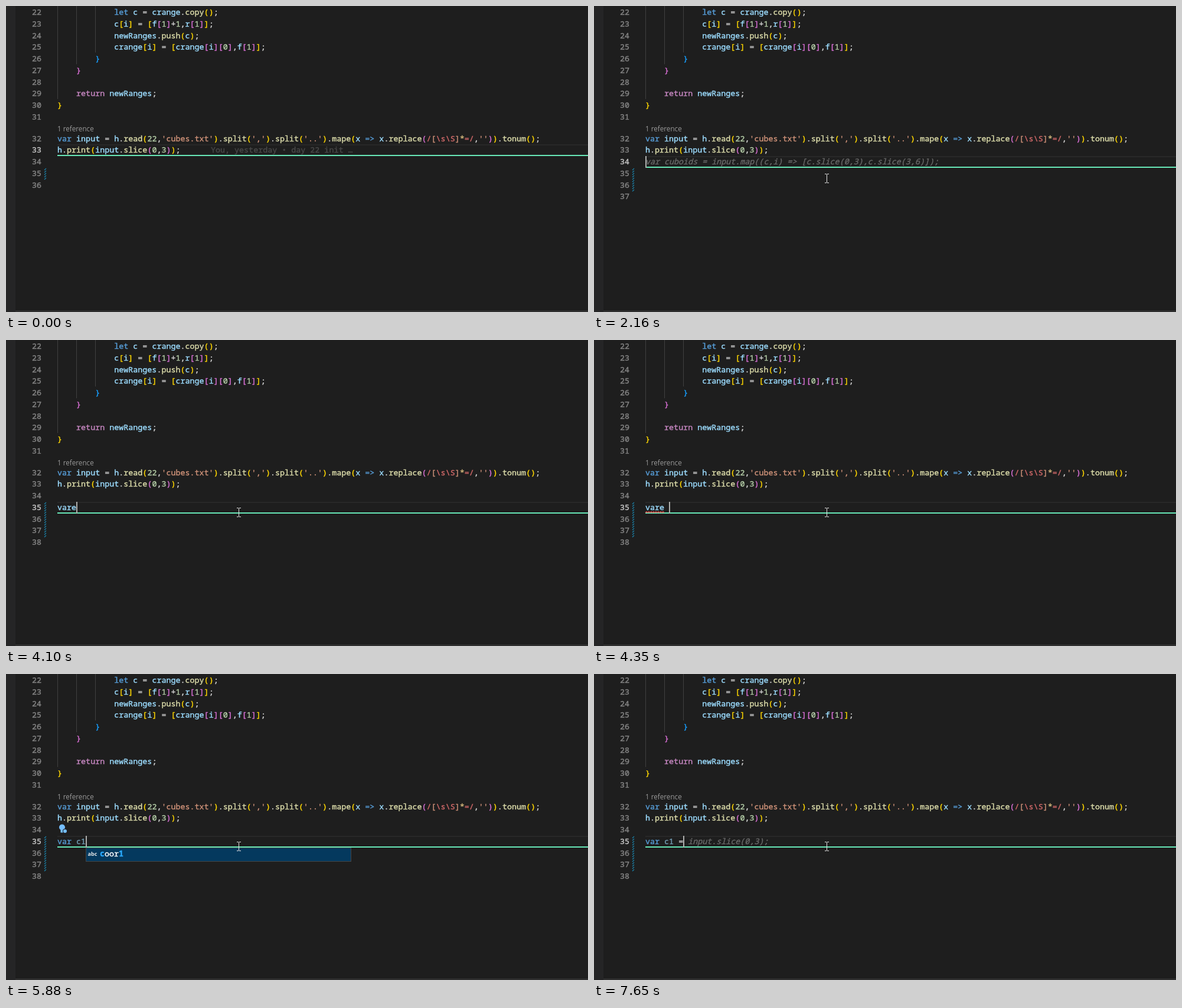
Write an HTML page with a canvas that moves like this. It is 986 by 520 pixels and loops after 8 s.

```html
<!DOCTYPE html>
<html lang="en">
<head>
<meta charset="utf-8">
<style>
  html, body { margin: 0; height: 100%; overflow: hidden; background: #1e1e1e; }
  canvas { display: block; }
</style>
</head>
<body>
<canvas id="stage" width="986" height="520"></canvas>
<script>
const ctx = document.getElementById('stage').getContext('2d');
const LOOP = 8000, LEFT = 87, CHAR = 8.02;
const MONO = '13.367px "Noto Sans Mono", monospace';
const BRACKETS = ['#ffd700', '#da70d6', '#179fff'];
const TOKEN = /'[^']*'|\/\[.*?=\/|=>|\w+|\s+|./g;

// line number: [indent, code, bracket depth at line start]
const CODE = {
  22: [12, 'let c = crange.copy();', 0],
  23: [12, 'c[i] = [f[1]+1,r[1]];', 0],
  24: [12, 'newRanges.push(c);', 0],
  25: [12, 'crange[i] = [crange[i][0],f[1]];', 0],
  26: [8, '}', 3],
  27: [4, '}', 2],
  29: [4, 'return newRanges;', 0],
  30: [0, '}', 1],
  32: [0, "var input = h.read(22,'cubes.txt').split(',').split('..').mape(x => x.replace(/[\\s\\S]*=/,'')).tonum();", 0],
  33: [0, 'h.print(input.slice(0,3));', 0]
};

const CUBOIDS = 'var cuboids = input.map((c,i) => [c.slice(0,3),c.slice(3,6)]);';
const IN_RANGE = 'var inRangeCuboids = (cuboid:number[][], ranges:number[][][]) : number[][][] => {';
const SLICE = 'var c1 = input.slice(0,3);';
const V_WORDS = ['var', 'variable', 'vector', 'value', 'values', 'valid', 'view', 'visit', 'vertex', 'void', 'volume', 'while'];
const C_WORDS = ['c', 'case', 'catch', 'class', 'const', 'continue', 'coor1', 'coor2', 'copy', 'crange', 'cubes', 'cuboid'];

// Each event changes part of the editor state.
const START = { line: 33, last: 36, changed: [35, 35], typed: '', ghost: '', caret: false, blame: true, popup: null, bulb: false, squiggle: false };
const EVENTS = [
  [900, { caret: true }],
  [1430, { caret: false }],
  [1960, { line: 34, last: 37, changed: [36, 36], caret: true, blame: false }],
  [2090, { changed: [35, 36] }],
  [2160, { ghost: CUBOIDS }],
  [2490, { caret: false }],
  [2690, { line: 35, last: 38, changed: [36, 37], caret: true, ghost: '' }],
  [2820, { changed: [35, 37] }],
  [2880, { ghost: IN_RANGE }],
  [3150, { caret: false }],
  [3500, { typed: 'v', caret: true }],
  [3630, { typed: 'va' }],
  [3760, { typed: 'var' }],
  [4100, { typed: 'vare', ghost: '' }],
  [4160, { popup: V_WORDS }],
  [4290, { squiggle: true }],
  [4350, { typed: 'vare ', popup: null }],
  [4410, { typed: 'vare' }],
  [4480, { typed: 'var', squiggle: false }],
  [4680, { ghost: IN_RANGE }],
  [4940, { typed: 'var ', ghost: '' }],
  [5000, { ghost: IN_RANGE }],
  [5200, { typed: 'var c', ghost: '', popup: C_WORDS }],
  [5550, { typed: 'var c1', popup: null }],
  [5620, { popup: ['coor1'] }],
  [5880, { bulb: true }],
  [6140, { caret: false }],
  [6200, { bulb: false }],
  [6460, { bulb: true }],
  [6530, { caret: true }],
  [6730, { typed: 'var c1 ', popup: null }],
  [6990, { bulb: false }],
  [7130, { caret: false }],
  [7190, { ghost: SLICE }],
  [7650, { typed: 'var c1 =', caret: true }]
];
const MOUSE = [[70, 612, 460], [220, 360, 380], [390, 73, 300], [600, 330, 255], [770, 380, 247], [900, 380, 247], [980, 384, 239], [1230, 394, 293]];

const baseline = n => Math.round(n < 32 ? 15 + (n - 22) * 19.75 : 229.7 + (n - 32) * 19.75);
const rowTop = n => baseline(n) - 14;
const colX = col => LEFT + col * CHAR;

function rect(x, y, w, h, color) {
  ctx.fillStyle = color;
  ctx.fillRect(x, y, w, h);
}

// A hairline outline gives the text its slightly heavy weight.
function text(str, x, y, color, font = MONO, weight = 0.4) {
  ctx.font = font;
  ctx.fillStyle = ctx.strokeStyle = color;
  ctx.lineWidth = weight;
  ctx.fillText(str, x, y);
  if (weight) ctx.strokeText(str, x, y);
}

function stroke(points, color, width = 1) {
  ctx.beginPath();
  points.forEach(([x, y]) => ctx.lineTo(x, y));
  ctx.strokeStyle = color;
  ctx.lineWidth = width;
  ctx.stroke();
}

function tokenColor(token, next) {
  if (token[0] === "'") return '#ce9178';
  if (token === '=>' || token === 'let' || token === 'var') return '#569cd6';
  if (token === 'return') return '#c586c0';
  if (/^\d/.test(token)) return '#b5cea8';
  if (/^\w/.test(token)) return next === '(' ? '#dcdcaa' : '#9cdcfe';
  return '#d4d4d4';
}

function drawCode(n, indent, code, depth, unused) {
  const y = baseline(n);
  for (const { 0: token, index } of code.matchAll(TOKEN)) {
    const x = colX(indent + index);
    if (token.startsWith('/[')) {
      [...token].forEach((ch, i) => text(ch, x + i * CHAR, y,
        '[]'.includes(ch) ? '#ce9178' : ch === '*' ? '#d7ba7d' : '#d16969'));
      continue;
    }
    let color = token === unused ? '#729db3' : tokenColor(token, code[index + token.length]);
    if ('([{'.includes(token)) color = BRACKETS[depth++ % 3];
    else if (')]}'.includes(token)) color = BRACKETS[--depth % 3];
    text(token, x, y, color);
  }
}

function drawGutter(s) {
  rect(0, 0, 16, 520, '#252526');
  for (let n = 22; n <= s.last; n++) text(n, 44, baseline(n), n === s.line ? '#c6c6c6' : '#858585');
  const top = rowTop(s.changed[0]), bottom = rowTop(s.changed[1]) + 20;
  for (let y = top; y < bottom; y += 4) stroke([[65, y + 4], [68, y + 1]], '#1b81a8', 1.2);
}

function drawPopup(words, typed) {
  const x = Math.round(colX(typed.length)), y = 295, rowHeight = 22;
  const prefix = typed.split(' ').pop();
  const height = words.length * rowHeight + 2;
  rect(x, y, 450, height, '#454545');
  rect(x + 1, y + 1, 448, height - 2, '#252526');
  rect(x + 1, y + 1, 448, rowHeight, '#04395e');
  words.forEach((word, row) => {
    const base = y + 15 + row * rowHeight;
    text('abc', x + 3.5, base - 1, '#e8e8e8', 'bold 9px "Open Sans", sans-serif', 0);
    let matched = 0;
    [...word].forEach((ch, i) => {
      const hit = ch === prefix[matched];
      if (hit) matched++;
      text(ch, x + 24 + i * CHAR, base, hit ? '#2aaaff' : '#ffffff', hit ? 'bold ' + MONO : MONO);
    });
  });
}

function drawBulb() {
  const disc = (x, y, r, color) => {
    ctx.beginPath();
    ctx.arc(x, y, r, 0, 7);
    ctx.fillStyle = color;
    ctx.fill();
  };
  disc(95, 260.5, 5, '#75beff');
  rect(92.5, 264, 5, 5.5, '#75beff');
  disc(100, 267, 4, '#1e1e1e');
  disc(100, 267, 3, '#75beff');
}

function drawMouse(t) {
  if (t < MOUSE[0][0]) return;
  const i = MOUSE.findIndex(p => p[0] > t);
  let [, x, y] = MOUSE[MOUSE.length - 1];
  if (i > 0) {
    const [t0, x0, y0] = MOUSE[i - 1], [t1, x1, y1] = MOUSE[i];
    const k = (t - t0) / (t1 - t0);
    x = Math.round(x0 + (x1 - x0) * k);
    y = Math.round(y0 + (y1 - y0) * k);
  }
  const white = '#e6e6e6';
  rect(x, y - 7, 1, 14, white);
  for (const dy of [-8, 7]) {
    rect(x - 3, y + dy, 3, 1, white);
    rect(x + 1, y + dy, 3, 1, white);
  }
}

function draw(t) {
  const s = Object.assign({}, START, ...EVENTS.filter(e => e[0] <= t).map(e => e[1]));
  const top = rowTop(s.line);
  rect(0, 0, 986, 520, '#1e1e1e');
  rect(16, 518, 970, 1, '#454545');
  [158, 99, 79].forEach((bottom, i) => rect(LEFT + i * 32, 0, 1, bottom, '#404040'));
  rect(LEFT, top, 899, 2, '#282828');
  rect(LEFT, top + 18, 899, 2, '#68e8b8');
  drawGutter(s);

  for (const n in CODE) drawCode(+n, ...CODE[n]);
  text('1 reference', LEFT, 213, '#999999', '11.7px "Open Sans", sans-serif', 0);
  if (s.blame) text('You, yesterday • day 22 init …', 347, baseline(33), '#484848');

  drawCode(s.line, 0, s.typed, 0, s.typed.split(' ')[1]);
  const end = s.typed.length;
  text(s.ghost.slice(end), colX(end), baseline(s.line), '#686868', 'italic ' + MONO);
  if (s.squiggle) {
    stroke(Array.from({ length: 17 }, (_, i) => [LEFT + i * 2, i % 2 ? 291.5 : 293.5]), '#f14c4c', 1.2);
  }
  if (s.bulb) drawBulb();
  if (s.popup) drawPopup(s.popup, s.typed);
  if (s.caret) {
    const col = s.line === 33 ? CODE[33][1].length : end;
    rect(Math.floor(colX(col)), top, 2, 20, '#aeafad');
  }
  drawMouse(t);
}

function tick() {
  draw(performance.now() % LOOP);
  requestAnimationFrame(tick);
}
tick();
</script>
</body>
</html>
```
